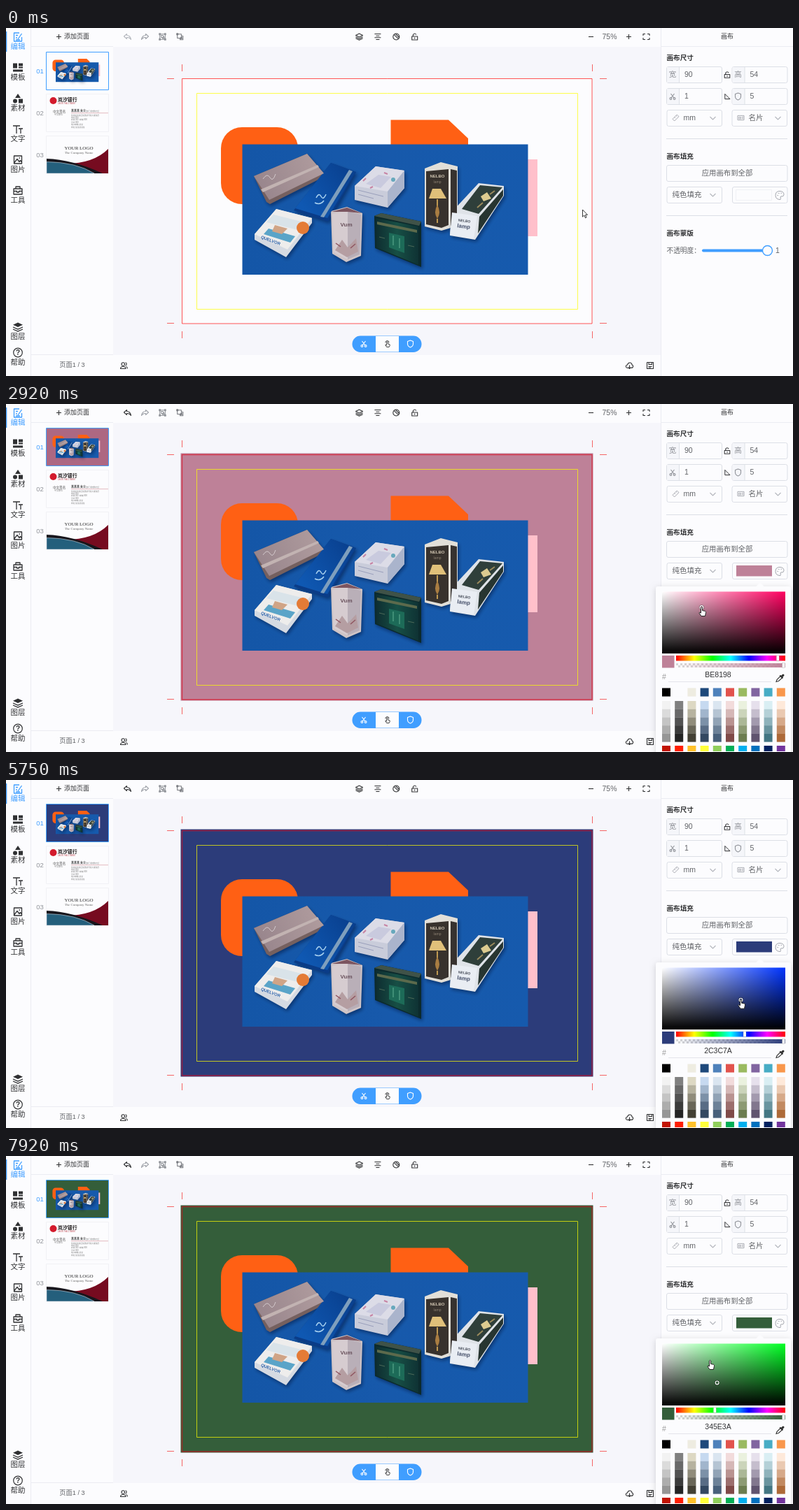
Recreate the animation shown at these times as an HTML page with a canvas. Size 1124x498 px, loop 8000 ms.

```html
<!DOCTYPE html>
<html lang="zh">
<head>
<meta charset="utf-8">
<title>画布填充</title>
<style>
html, body { margin: 0; width: 100%; height: 100%; overflow: hidden; background: #fcfcfe; }
canvas { display: block; }
</style>
</head>
<body>
<canvas id="stage" width="1124" height="498"></canvas>
<script>
const W = 1124, H = 498, LOOP = 8000, STEP = 1000 / 12;
const SANS = '"Liberation Sans","Noto Sans CJK SC","Noto Sans CJK",sans-serif';
const SERIF = '"Liberation Serif",serif';
const BLUE = '#409eff', INK = '#303133', GREY = '#606266', PALE = '#b4b7be', LINE = '#dcdfe6', WHITE = '#fcfcfe';
const screen = document.getElementById('stage').getContext('2d');
const layer = document.createElement('canvas');
layer.width = W;
layer.height = H;
const popup = layer.getContext('2d');
let c = screen;

// ---------- drawing helpers ----------
function rect(x, y, w, h, fill) {
  c.fillStyle = fill;
  c.fillRect(x, y, w, h);
}
function frame(x, y, w, h, stroke, lw = 1) {
  c.strokeStyle = stroke;
  c.lineWidth = lw;
  c.strokeRect(x, y, w, h);
}
function shape(d, fill, stroke, lw = 1) {
  const p = new Path2D(d);
  if (fill) { c.fillStyle = fill; c.fill(p); }
  if (stroke) { c.strokeStyle = stroke; c.lineWidth = lw; c.stroke(p); }
}
function round(x, y, w, h, r, fill, stroke) {
  c.beginPath();
  c.roundRect(x, y, w, h, r);
  if (fill) { c.fillStyle = fill; c.fill(); }
  if (stroke) { c.strokeStyle = stroke; c.lineWidth = 1; c.stroke(); }
}
function disc(x, y, r, fill, stroke, lw = 1) {
  c.beginPath();
  c.arc(x, y, r, 0, 7);
  if (fill) { c.fillStyle = fill; c.fill(); }
  if (stroke) { c.strokeStyle = stroke; c.lineWidth = lw; c.stroke(); }
}
function text(s, x, y, size, color = INK, align = 'left', weight = 400, family = SANS) {
  c.font = `${weight} ${size}px ${family}`;
  c.textAlign = align;
  c.textBaseline = 'middle';
  c.fillStyle = color;
  c.fillText(s, x, y + size * .04);
}
function at(x, y, draw, angle = 0, scale = 1) {
  c.save();
  c.translate(x, y);
  c.rotate(angle);
  c.scale(scale, scale);
  draw();
  c.restore();
}
function icon(name, x, y, color = INK, scale = 1, lw = 1.1) {
  at(x, y, () => {
    const [lines, solid] = ICONS[name];
    if (solid) shape(solid, color);
    if (lines) shape(lines, null, color, lw);
  }, 0, scale);
}
function gradient(x0, y0, x1, y1, colors) {
  const g = c.createLinearGradient(x0, y0, x1, y1);
  colors.forEach((col, i) => g.addColorStop(i / (colors.length - 1), col));
  return g;
}

const RING = 'M-4.5,0A4.5,4.5 0 1 1 4.5,0A4.5,4.5 0 1 1 -4.5,0Z';
const ICONS = {
  edit: ['M2,-6H-5.5V6H5.5V0M-3,-2.5H0M-3,1H-1M0,3L5.5,-5M-3,4H3'],
  template: [null, 'M-7,-6H-1V1H-7ZM1,-6H7V-2H1ZM1,-1H7V1H1ZM-7,3H7V6H-7Z'],
  material: [null, 'M0,-7L4,-1H-4ZM-7,3.5A3,3 0 1 1 -1,3.5A3,3 0 1 1 -7,3.5ZM1,.5H7V6.5H1Z'],
  type: ['M-7,-5H3M-2,-5V6M1,-1H7M4,-1V6'],
  picture: ['M-5.5,-5.5H5.5V5.5H-5.5ZM-5,4L-1,-1L2,3L3.5,1L5.5,3.5M1.5,-2.5H3'],
  tools: ['M-6,-2.5H6V5.5H-6ZM-3,-2.5V-5.5H3V-2.5M-6,1H-1.5V2.5H1.5V1H6'],
  layers: ['M-7,0L0,3.2L7,0M-7,3L0,6.2L7,3', 'M0,-6.5L7,-3.2L0,0L-7,-3.2Z'],
  stack: ['M0,-4.5L5,-2L0,.5L-5,-2ZM-5,.3L0,2.7L5,.3M-5,2.3L0,4.7L5,2.3'],
  undo: ['M-1,-4L-5,-.5L-1,3V1Q3,.5 5,4Q4,-2 -1,-2Z'],
  redo: ['M1,-4L5,-.5L1,3V1Q-3,.5 -5,4Q-4,-2 1,-2Z'],
  group: ['M-4,-4H4V4H-4ZM-2,-2H1V1H-2ZM0,1V2.5H2.5V0H1M-5,-5H-3V-3H-5ZM3,-5H5V-3H3ZM-5,3H-3V5H-5ZM3,3H5V5H3Z'],
  ungroup: ['M-4,-4H2V2H-4ZM0,2V4.5H4.5V-1H2M-5,-5H-3V-3H-5ZM1,1H3V3H1Z'],
  align: ['M-4.5,-4H4.5M-2.5,-1.3H2.5M-4.5,1.3H4.5M-2.5,4H2.5'],
  clear: [RING + 'M-3.2,-3.2L3.2,3.2M-1,-4.2L4.2,1'],
  lock: ['M-4,-.5H4V4.5H-4ZM-2.3,-.5V-3Q0,-6 2.3,-3M0,1V3'],
  minus: ['M-3.5,0H3.5'],
  plus: ['M-3.5,0H3.5M0,-3.5V3.5'],
  full: ['M-4.5,-1.5V-4H-1.5M1.5,-4H4.5V-1.5M4.5,1.5V4H1.5M-1.5,4H-4.5V1.5'],
  cut: ['M-2.5,-4L2,2M2.5,-4L-2,2M-4,3A1.4,1.4 0 1 1 -1.2,3A1.4,1.4 0 1 1 -4,3ZM1.2,3A1.4,1.4 0 1 1 4,3A1.4,1.4 0 1 1 1.2,3Z'],
  shield: ['M0,-5L4,-3.5V0Q4,3.5 0,5Q-4,3.5 -4,0V-3.5Z'],
  touch: ['M-1,2V-3Q0,-4.5 1,-3V0L4,1V3L3,5H-1L-3,1.5ZM-3,-2Q-2.5,-5 0,-5Q2.5,-5 3,-2'],
  people: ['M-3.5,-2A2.2,2.2 0 1 1 1,-2A2.2,2.2 0 1 1 -3.5,-2ZM-5,4.5Q-5,1.5 -1.2,1.5Q2.5,1.5 2.5,4.5ZM2,-4.3Q4,-4 3.5,-1.5Q3,0 2,0M3,1.5Q5,2 5,4.5'],
  cloud: ['M-2,3.5H-3Q-5.5,3 -5,.5Q-4.5,-1 -3,-1Q-2,-4.5 1,-4Q3.5,-3.5 3.5,-1Q5.5,-.5 5,2Q4.5,3.5 2,3.5M0,-.5V4.5M-2,2.5L0,4.5L2,2.5'],
  save: ['M-4.5,-4.5H4.5V4.5H-4.5ZM-2,-4.5V-1.5H2.5V-4.5M-2.5,1.5H2.5M-2.5,3H1'],
  angle: ['M-3,-4V4H5Z'],
  ruler: ['M-5,2L2,-5L5,-2L-2,5ZM-2,-1L-.5,.5M.5,-3.5L2,-2'],
  card: ['M-5,-3.5H5V3.5H-5ZM-3,-1H0V1.5H-3ZM1.5,-1H4M1.5,1H4'],
  down: ['M-4,-2L0,2L4,-2'],
  palette: ['M1,6Q-6,6 -6,0Q-6,-6 0,-6Q6,-6 6,-1Q6,2 2,1.5Q0,2 1.5,4ZM-3.5,0H-2M-2,-3H-.5M1.5,-3.2H3'],
  dropper: ['M-5.5,5.5L-4.5,2.5L1,-3L3.5,-.5L-2,4.5Z', 'M0,-4L2,-3.5Q4,-6.5 5.5,-5Q7,-3.5 4,-1.5L4.5,0L3,1L-1,-3Z'],
};

// ---------- colour ----------
const rgb = hex => [0, 2, 4].map(i => parseInt(hex.substr(i, 2), 16));
const toHex = a => a.map(v => Math.round(v).toString(16).padStart(2, '0')).join('').toUpperCase();
const mix = (a, b, k) => a.map((v, i) => v + (b[i] - v) * k);
function toHsv(hex) {
  const [r, g, b] = rgb(hex), max = Math.max(r, g, b), d = max - Math.min(r, g, b);
  const h = max === r ? (g - b) / d : max === g ? 2 + (b - r) / d : 4 + (r - g) / d;
  return [(h * 60 + 360) % 360, d / max, max / 255];
}
function fromHsv([h, s, v]) {
  return toHex([5, 3, 1].map(n => {
    const k = (n + h / 60) % 6;
    return 255 * v * (1 - s * Math.max(0, Math.min(k, 4 - k, 1)));
  }));
}

// ---------- timeline ----------
function between(keys, t) {
  let i = 0;
  while (i < keys.length - 1 && keys[i + 1][0] <= t) i++;
  const a = keys[i], b = keys[Math.min(i + 1, keys.length - 1)];
  return [a, b, b === a ? 0 : Math.max(0, (t - a[0]) / (b[0] - a[0]))];
}
const PICK_START = 2240;
const PICKS = [
  [PICK_START, 'E86B99'], [2600, 'AD6882'], [2900, 'BE8198'], [3000, 'BE8198'], [3420, 'BC436F'], [4500, 'BC436F'],
  [4740, '435BBC'], [5260, '435BBC'], [5580, '2C3C7A'], [6140, '2C3C7A'], [6410, '2C7A38'], [6790, '2C7A38'],
  [7150, '4F965A'], [7240, '4F965A'], [7600, '345E3A'],
].map(([t, hex]) => [t, toHsv(hex)]);
// The thumbnail only refreshes once a drag pauses.
const THUMB_UPDATES = [2600, 3200, 3580, 5000, 5660, 6580, 7410, 7740];
function hsvAt(t) {
  const [a, b, k] = between(PICKS, t);
  return mix(a[1], b[1], k);
}
const dot = ([, s, v]) => [937 + s * 176, 268.5 + (1 - v) * 88.5];
const hueKnob = ([h]) => [957 + h / 360 * 155, 364];
const spot = (x, y) => () => [x, y];
const MOVES = [
  [0, spot(823.5, 260)], [250, spot(823.5, 260)], [410, spot(850, 256)], [1000, spot(1019, 275)],
  [1420, spot(1061, 243)], [1900, spot(1061, 243)], [PICK_START, dot], [3700, dot], [4240, hueKnob],
  [5000, hueKnob], [5260, dot], [5900, dot], [6140, hueKnob], [6500, hueKnob], [6790, dot], [7600, dot],
  [7900, spot(1005.5, 293)],
];
function cursorAt(t, hsv) {
  const [a, b, k] = between(MOVES, t);
  return mix(a[1](hsv), b[1](hsv), k);
}

// ---------- the card ----------
function products() {
  c.save();
  c.shadowColor = 'rgba(0,20,60,.5)';
  c.shadowBlur = 5;
  c.shadowOffsetX = 2;
  c.shadowOffsetY = 3;
  shape('M464,193L500,206L460,277L411,261Z', '#0a3c88');
  shape('M354,212L430,180L454,208V213L377,252L372,249Z', '#75605f');
  shape('M498,226L528,198L569,204V229L545,257L498,246Z', '#c9ccda');
  shape('M598,201L621,192L645,198V283L622,290L598,284Z', '#e2dfd8');
  shape('M636,264L675,222L711,226V240L670,303L634,297Z', '#dfe3e8');
  shape('M355,295L386,259L437,272V279L400,328L355,303Z', '#d5dae2');
  shape('M464,262L487,256L509,265L507,326L486,335L466,323Z', '#cfc4c6');
  shape('M526,269L536,265L593,277V342L527,315Z', '#0c2a2c');
  c.restore();

  shape('M464,193L499,206L459,272L413,258Z', gradient(420, 250, 490, 200, ['#0f58b2', '#09408f']));
  shape('M490,203L495,205L454,271L449,270Z', '#7f9fbd');
  shape('M443,243q4,-8 7,-2t7,-3M441,250q8,4 13,-3', null, '#a9d2f0', 1.5);
  shape('M354,212L430,180L454,208L376,246Z', gradient(360, 230, 450, 190, ['#98858c', '#b09c9e']));
  shape('M364,231L445,196L447,199L367,235Z', '#c2b3b2');
  shape('M367,216q6,-9 10,-2t8,-5', null, '#d3c9cc');

  shape('M498,226L528,198L569,204L545,234Z', '#dcdce7');
  shape('M545,234L569,204V229L545,257Z', '#aab4cc');
  shape('M514,223L532,210L550,213L535,229Z', '#c9cade');
  shape('M510,219l4,-4M540,207l5,2M520,229l4,-2', null, '#c783a4', 2);
  shape('M503,232L539,241M503,238L525,244', null, '#999fbb');
  disc(553, 217, 3, '#67a8bc');

  shape('M600,205L632,202V282L622,286L600,281Z', '#38322d');
  shape('M635,202L644,204V280L635,283Z', '#37322f');
  shape('M609,230H621L629,244H604Z', '#e0c07a');
  shape('M616,245V257M616,273V279', null, '#c09a52', 2);
  shape('M616,253Q610,264 616,273Q622,264 616,253Z', '#a97d42');
  text('NELBO', 616, 212, 6, '#cfc4b0', 'center', 700);
  text('lamp', 616, 220, 5, '#8f8475', 'center');

  shape('M651,259L677,225L709,228L675,266Z', '#2f3f3a');
  shape('M676,270L710,231V240L674,294Z', '#273531');
  shape('M678,241L687,235L693,244L682,248Z', '#dccb90');
  shape('M681,250L673,257M691,238L698,233', null, '#9a8a5c', 2);
  shape('M637,264L673,269L668,302L634,296Z', '#e9edf3');
  at(654, 281, () => {
    text('NELBO', 0, -5, 5, '#424855', 'center', 700);
    text('lamp', 0, 3, 8, '#46506a', 'center', 700);
  }, .13);

  shape('M355,295L386,259L437,272L402,317Z', '#eeedec');
  shape('M372,278L382,267L426,278L417,289Z', '#d9e3e9');
  shape('M375,287L413,298L406,307L368,295Z', '#5aa4c8');
  shape('M384,282L402,287L394,295L380,291Z', '#d0a486');
  disc(424, 286, 9, '#e47b36');
  at(378, 304, () => text('QUELVOR', 0, 0, 6, '#245ca8', 'center', 700), .36);

  shape('M466,266L488,261V331L468,321Z', '#d6ccd0');
  shape('M488,262L507,267L505,324L488,331Z', '#b9afb8');
  shape('M465,263L487,257L508,265L488,263Z', '#7c5560');
  shape('M470,318L480,303L488,314L500,301L503,320L487,328Z', '#b59ea2');
  shape('M471,308l7,5m14,2l7,-6', null, '#8f5560', 1.5);
  text('Vum', 486, 281, 8, '#68505b', 'center', 700);

  shape('M526,269L536,265L593,277L590,283Z', '#3f5248');
  shape('M528,272L589,284V339L529,314Z', gradient(528, 300, 589, 300, ['#0e2d30', '#174f45', '#0f3234']));
  shape('M530,277L587,289V293L530,281Z', '#5c6a4c');
  shape('M547,293L569,298V322L547,314Z', '#1d6b58');
  shape('M553,297V311M562,301V315', null, '#4b9a80', 1.5);
  shape('M533,299L541,301M574,311L583,313', null, '#4d6a58');
}

function card() {
  round(307, 142, 110, 110, 30, '#ff6014');
  shape('M549.5,131.5H632L660,158V240H549.5Z', '#ff6014');
  rect(649, 188, 110, 110, '#ffc0cb');
  rect(337.5, 166.5, 408, 186.5, gradient(337, 0, 745, 0, ['#1456a7', '#1759ab', '#165aad']));
  products();
}

// ---------- editor chrome ----------
function rail() {
  rect(0, 0, 35, H, WHITE);
  rect(35, 0, 1, H, '#ebecf2');
  rect(0, 5, 1.3, 29, BLUE);
  const items = [
    ['edit', '编辑', 13, 27], ['template', '模板', 56.5, 71], ['material', '素材', 101, 115], ['type', '文字', 145, 158.5],
    ['picture', '图片', 188.5, 202.5], ['tools', '工具', 232.5, 246.5], ['layers', '图层', 428, 441.5],
  ];
  items.forEach(([name, label, iy, ty], i) => {
    const color = i ? INK : BLUE;
    icon(name, 17, iy, color, 1, 1.3);
    text(label, 17, ty, 10.5, color, 'center');
  });
  disc(17, 464.5, 6.3, null, INK, 1.2);
  text('?', 17, 464.5, 10, INK, 'center', 700);
  text('帮助', 17, 479, 10.5, INK, 'center');
}

function bankCard() {
  rect(58, 95, 88, 53, WHITE);
  disc(67.5, 104, 5, '#d31a2c');
  text('岚汐银行', 74, 102.5, 6.9, '#211d1e', 'left', 700);
  text('LANXI HALL BANK', 74, 108, 2.9, '#c55a64');
  text('中文签名', 67, 119.5, 4.6, '#555');
  text('中文职位', 69, 124.5, 3, '#777');
  text('某某某 女士', 93, 119, 4, '#444', 'left', 700);
  text('(部门经理职位)', 114, 119.5, 2.8, '#777');
  rect(93, 121.4, 53, .7, '#dba1a6');
  ['某省某市某区某路某号某大厦某层', '电话 000', '传真 000  邮编 000', '手机 000', '电子邮箱 某某', '网址 某某某某某']
    .forEach((s, i) => text(s, 93, 124.7 + i * 3.4, 2.7, '#777'));
}

function companyCard() {
  rect(58, 155, 88, 53, WHITE);
  c.save();
  c.beginPath();
  c.rect(58, 155, 88, 53);
  c.clip();
  shape('M146,173Q124,195 82,194Q110,201 124,208H146Z', '#760b20');
  shape('M58,187Q94,188 138,208H58Z', '#17151c');
  shape('M58,191.5Q100,192 126,208H58Z', '#245f7c', '#c3ced9', .6);
  c.restore();
  text('YOUR LOGO', 104, 172, 7, '#222', 'center', 400, SERIF);
  text('The Company Name', 104, 178.5, 4.9, '#666', 'center', 400, SERIF);
}

function pages(thumbFill) {
  rect(36, 0, 117, H, WHITE);
  rect(36, 26, 117, 1, '#ebecf2');
  rect(36, 467, 117, 1, '#ebecf2');
  icon('plus', 75.5, 12.5);
  text('添加页面', 83, 12.5, 9);
  text('页面1 / 3', 94.5, 482.5, 9.2, GREY, 'center');
  ['01', '02', '03'].forEach((s, i) => text(s, 48.5, 62 + i * 60, 9.5, i ? '#909399' : BLUE, 'center'));
  c.save();
  c.beginPath();
  c.rect(58, 35, 88, 53);
  c.clip();
  rect(58, 35, 88, 53, thumbFill);
  c.translate(58, 35);
  c.scale(.1502, .1502);
  c.translate(-251, -72);
  card();
  c.restore();
  frame(57.5, 34.5, 89, 54, BLUE);
  frame(57.5, 94.5, 89, 54, '#f1f1f5');
  frame(57.5, 154.5, 89, 54, '#f1f1f5');
  bankCard();
  companyCard();
}

function toolbars(active) {
  rect(153, 0, 782, 27, WHITE);
  rect(153, 468, 782, 30, WHITE);
  icon('undo', 173.5, 12.5, active ? INK : PALE);
  icon('redo', 198.5, 12.5, '#a0a3aa');
  icon('group', 223.5, 12.5, '#909399', .95);
  icon('ungroup', 248.5, 12.5, '#77797f', .95);
  ['stack', 'align', 'clear', 'lock'].forEach((n, i) => icon(n, 504.5 + i * 26.4, 12.5));
  icon('minus', 835.5, 12.5);
  text('75%', 862, 13, 10.5, GREY, 'center');
  icon('plus', 889.5, 12.5);
  icon('full', 914.5, 12.5);
  icon('people', 168.5, 483);
  icon('cloud', 890.5, 483);
  icon('save', 920, 483);
}

function workspace(fill) {
  rect(153, 27, 782, 441, '#f6f6fb');
  if (fill) rect(249.5, 70.5, 589, 354, fill);
  else rect(251, 72, 586, 351, WHITE);
  card();
  frame(251.5, 72.5, 585.5, 350.5, fill ? 'rgba(225,10,30,.62)' : 'rgba(255,20,20,.72)', fill ? 1.4 : 1);
  frame(272.5, 93.5, 544, 309, 'rgba(255,255,0,.7)');
  for (const x of [251, 837]) for (const y of [52, 434]) rect(x, y, 1, 10, '#f56565');
  for (const x of [230, 848]) for (const y of [72, 422]) rect(x, y, 10, 1, '#f56565');
  round(494.5, 440.5, 99, 23.5, 11.7, BLUE);
  rect(528, 441, 33, 22.5, WHITE);
  icon('cut', 511, 452, '#fff');
  icon('touch', 544.5, 452, INK, .9, 1);
  icon('shield', 577.5, 452, '#fff');
}

function field(x, y, mark, value) {
  round(x + .5, y + .5, 79, 23, 2.5, WHITE, LINE);
  rect(x + 1, y + 1, 17, 22, '#f5f6fa');
  rect(x + 18, y + 1, 1, 22, LINE);
  if (ICONS[mark]) icon(mark, x + 9, y + 12, '#909399');
  else text(mark, x + 9, y + 12, 10.5, '#909399', 'center');
  text(value, x + 26, y + 11.5, 10.5, GREY);
}
function select(x, y, label, mark) {
  round(x + .5, y + .5, 78.5, 23, 2.5, WHITE, LINE);
  if (mark) icon(mark, x + 13, y + 11.5, '#a8abb2', .9);
  text(label, x + (mark ? 24 : 8), y + 12, 10.5, GREY);
  icon('down', x + 66, y + 12, PALE);
}

function properties(fill, hover) {
  rect(935, 0, 189, H, WHITE);
  rect(935, 0, 1, H, '#ebecf2');
  rect(935, 26, 189, 1, '#ebecf2');
  text('画布', 1030, 12.5, 9, INK, 'center');
  [['画布尺寸', 42.5], ['画布填充', 183.5], ['画布蒙版', 294]].forEach(([s, y]) => text(s, 943.5, y, 9.6, INK, 'left', 700));
  field(943, 55, '宽', '90');
  field(1036.5, 55, '高', '54');
  field(943, 86, 'cut', '1');
  field(1036.5, 86, 'shield', '5');
  icon('lock', 1030, 67, INK, .95);
  icon('angle', 1029.5, 98, INK, .9);
  select(943.5, 117, 'mm', 'ruler');
  select(1036.5, 117, '名片', 'card');
  rect(943, 158, 173, 1, LINE);
  round(943.5, 196.5, 172.5, 23, 2.5, WHITE, LINE);
  text('应用画布到全部', 1030, 208, 10.4, GREY, 'center');
  select(943.5, 227, '纯色填充');
  round(1037.5, 227.5, 78.5, 23, 2.5, hover ? '#ecf5ff' : WHITE, hover ? '#b8dafd' : LINE);
  rect(1043, 231, 51, 15.5, fill || WHITE);
  if (!fill) frame(1042.5, 231.5, 51, 15, '#f0f1f5');
  icon('palette', 1105, 239.5, '#a3a6ad', 1, 1);
  rect(943, 268, 173, 1, LINE);
  text('不透明度：', 943.5, 319, 9.7, GREY);
  round(994, 316.5, 95, 4, 2, BLUE);
  disc(1087.5, 318.5, 7, WHITE, BLUE, 1.4);
  text('1', 1099, 319, 10.5, GREY);
}

// ---------- colour popup ----------
const THEME = '000000 fcfcfe eeece1 1e497b 4e81bb e2534d 9aba60 8165a0 47acc5 f9974c'.split(' ');
const STANDARD = 'c21401 ff1e02 ffc12a ffff3a 90cf5b 00af57 00afee 0071be 00215f 72349d'.split(' ');
const LIGHTS = 'f2f2f2 808080 ddd8c3 c6d9f0 dae5f0 f2dbdb eaf1de e6e0ec d9eef3 fee9da'.split(' ').map(rgb);
const DARKS = '7f7f7f 0d0d0d 1c1a10 0e243d 233f5e 632623 4d602c 3f3150 1e5867 99490f'.split(' ').map(rgb);

function picker(hsv) {
  const hex = fromHsv(hsv), [dx, dy] = dot(hsv), [hx] = hueKnob(hsv);
  c.clearRect(0, 0, W, H);
  c.save();
  c.shadowColor = 'rgba(0,0,0,.16)';
  c.shadowBlur = 9;
  c.shadowOffsetY = 2;
  round(928, 261, 193, 260, 3, WHITE);
  c.restore();
  shape('M1071,261.5L1077,256L1083,261.5Z', WHITE);

  rect(937, 268.5, 176, 88.5, gradient(937, 0, 1113, 0, ['#fff', '#' + fromHsv([hsv[0], 1, 1])]));
  rect(937, 268.5, 176, 88.5, gradient(0, 268.5, 0, 357, ['rgba(0,0,0,0)', '#000']));
  disc(dx, dy, 2.6, null, 'rgba(0,0,0,.5)', 2);
  disc(dx, dy, 2.4, null, '#fff', 1.2);

  rect(937, 360, 17.5, 17.5, '#' + hex);
  rect(957, 360, 156, 7.5, gradient(957, 0, 1113, 0, ['#f00', '#ff0', '#0f0', '#0ff', '#00f', '#f0f', '#f00']));
  for (let i = 0; i < 52; i++) for (const row of [0, 1]) {
    rect(957 + i * 3, 371 + row * 3, 3, 3, (i + row) % 2 ? '#fff' : '#d8d8d8');
  }
  rect(957, 371, 156, 6, gradient(957, 0, 1113, 0, [`#${hex}00`, `#${hex}`]));
  for (const [x, y, h] of [[hx, 360, 7.5], [1110.5, 370.5, 7]]) {
    rect(x - 2, y, 4, h, '#fff');
    frame(x - 2, y, 4, h, 'rgba(0,0,0,.25)', .5);
  }
  text('#', 937, 391, 10.5, '#999');
  text(hex, 1017, 388, 10.5, INK, 'center');
  rect(946, 397, 147, 1, '#e3e4ea');
  icon('dropper', 1105.5, 392, '#333');

  for (let i = 0; i < 10; i++) {
    const x = 937 + i * 18.2;
    rect(x, 406.5, 12, 12, '#' + THEME[i]);
    for (let j = 0; j < 5; j++) rect(x, 425 + j * 11.7, 12, 11.8, '#' + toHex(mix(LIGHTS[i], DARKS[i], j / 5)));
    rect(x, 489, 12, 8, '#' + STANDARD[i]);
  }
}

function cursor([x, y], hand) {
  at(x, y, () => {
    if (hand) shape('M-1,0Q0,-1.3 1,0V4.5L5,5.3Q6.3,5.8 6,7.5L5,12.5H-.5L-3.6,8Q-3.5,6.3 -1,8Z', '#fff', '#222', 1);
    else shape('M0,0V10.2L2.3,8L4,11.8L5.5,11L4,7.3H7Z', '#fff', '#222', .9);
  });
}

function render(now) {
  const t = Math.floor((now % LOOP) / STEP + .001) * STEP;
  const hsv = hsvAt(t), fill = t >= PICK_START ? '#' + fromHsv(hsv) : null;
  const update = THUMB_UPDATES.filter(u => u <= t).pop();
  const pos = cursorAt(t, hsv);
  const overField = pos[0] > 1037 && pos[1] > 227 && pos[1] < 251;
  const shown = Math.max(0, Math.min(1, (t - 1580) / 250));

  c = screen;
  c.lineJoin = 'round';
  workspace(fill);
  pages(update ? '#' + fromHsv(hsvAt(update)) : WHITE);
  rail();
  toolbars(fill);
  properties(fill, overField);
  if (shown) {
    c = popup;
    picker(hsv);
    c = screen;
    c.globalAlpha = shown;
    c.drawImage(layer, 0, 0);
    c.globalAlpha = 1;
  }
  cursor(pos, overField || t > 1400);
}

const start = performance.now();
function tick() {
  render(performance.now() - start);
  requestAnimationFrame(tick);
}
tick();
</script>
</body>
</html>
```
